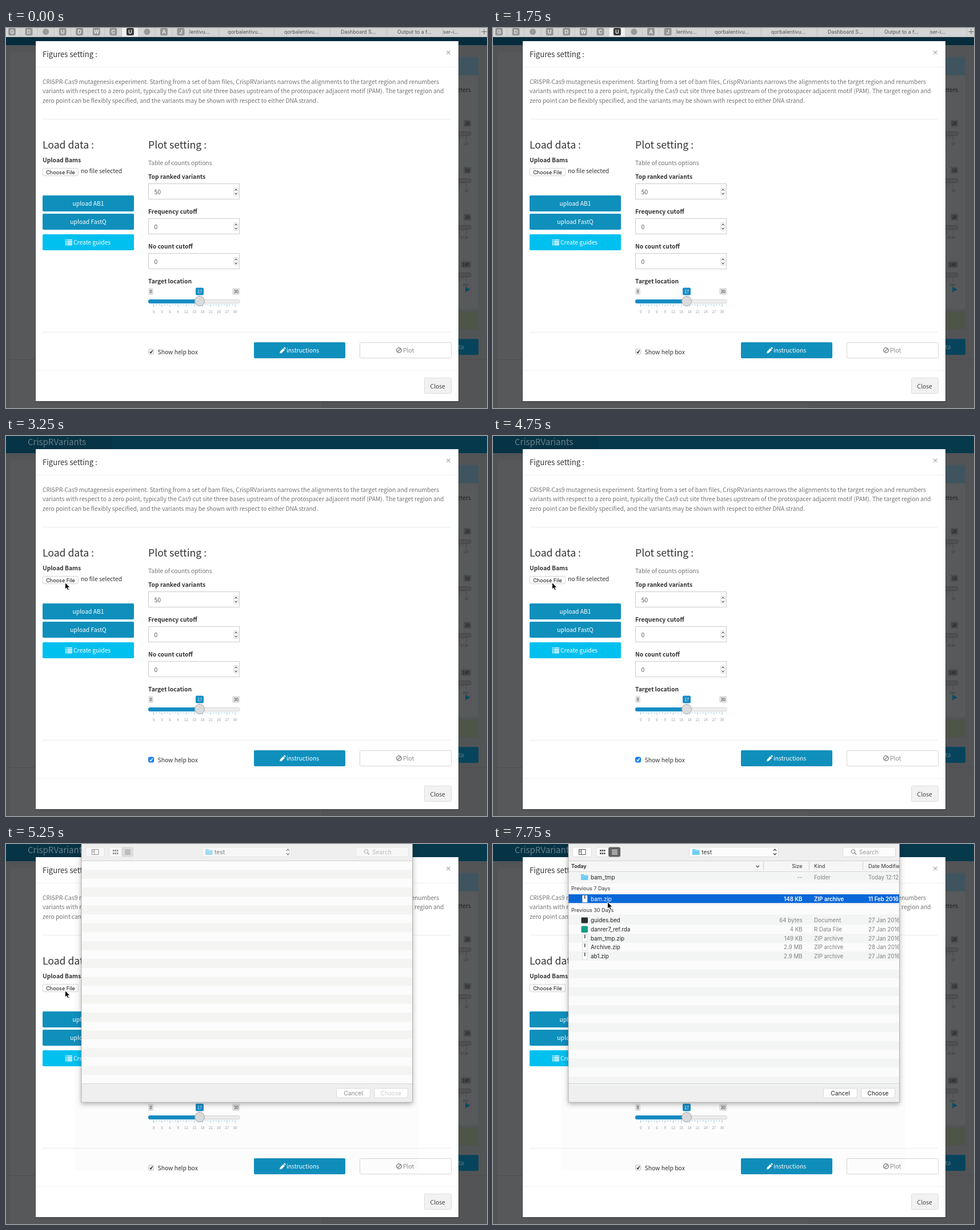
Animation of 842x665 px, one loop 8000 ms. Source, as an HTML page:

```html
<!DOCTYPE html>
<html lang="en">
<head>
<meta charset="utf-8">
<title>Figures setting</title>
<style>
html, body { margin: 0; width: 100%; height: 100%; overflow: hidden; background: #525456; }
svg { display: block; width: 842px; height: 665px; }
text { font-family: "Noto Sans CJK JP", "Noto Sans CJK SC", "Noto Sans CJK", "Open Sans", sans-serif; white-space: pre; }
text.ui { font-family: Inter, Roboto, sans-serif; }
</style>
</head>
<body>
<svg id="stage" viewBox="0 0 842 665" xmlns="http://www.w3.org/2000/svg"></svg>
<script>
const LOOP = 8000, STEP = 250;
const BLUE = '#0f8fbc';

const rect = (x, y, w, h, fill, extra = '') =>
  `<rect x="${x}" y="${y}" width="${w}" height="${h}" fill="${fill}" ${extra}/>`;
const text = (x, y, s, size = 10.3, fill = '#333', extra = '') =>
  `<text x="${x}" y="${y}" font-size="${size}" fill="${fill}" ${extra}>${s}</text>`;
const path = (d, stroke, extra = '') =>
  `<path d="${d}" fill="none" stroke="${stroke}" ${extra}/>`;
const ui = (x, y, s, size = 9.7, fill = '#222', extra = '') =>
  text(x, y, s, size, fill, `class="ui" ${extra}`);
const group = (id, body, extra = '') => `<g id="${id}" ${extra}>${body}</g>`;
const each = (list, fn) => list.map(fn).join('');
const range = n => Array.from({ length: n }, (_, i) => i);
const BOLD = 'font-weight="700"', MID = 'text-anchor="middle"', END = 'text-anchor="end"';

function backdrop() {
  const sliders = [[167, '20', '20'], [249, '10', '10'], [331, '20', '15 20'], [414, '180', '180']];
  return rect(0, 0, 842, 665, '#525456') +
    rect(8, 43, 544, 622, '#575859') +
    rect(560, 51, 267, 441, '#58595a', 'stroke="#4a565c"') +
    rect(560, 51, 267, 32, '#40545f') +
    rect(560, 496, 267, 31, '#4d5548') +
    rect(0, 580, 842, 1, '#4c4e50') +
    text(790, 112, 'eters', 10.3, '#1d1f20') +
    each(sliders, ([y, top, low]) =>
      rect(top.length > 2 ? 796 : 801, y - 6, top.length > 2 ? 18 : 13, 12, '#494b4d', 'rx="2"') +
      text(top.length > 2 ? 805 : 807.5, y + 3, top, 7.4, '#111', MID) +
      rect(700, y + 14.5, 114, 7, '#4e5052', 'rx="3" stroke="#424446"') +
      path(`M794.5 ${y + 22}v8M799.5 ${y + 22}v4M805.5 ${y + 22}v8`, '#45494c') +
      text(809, y + 38, low, 5.8, '#363839', END)) +
    '<path d="M804 452.5L813 457.5L804 462.5Z" fill="#0d4b63"/>' +
    rect(700, 544, 127, 28, '#06445c', 'rx="2"') + text(792, 562, 'ta', 10.3, '#677b84') +
    group('header', rect(0, 0, 842, 30, '#06394c') + rect(0, 0, 185, 30, '#063345') +
      text(38, 15.5, 'CrispRVariants', 15, '#68818c')) +
    rect(0, 0, 842, 30, '#052c3c', 'id="dark"');
}

function tabBar() {
  const pins = 'GD UDWCU AJ'.split('');
  const tabs = [[321, 'lentivu...'], [388, 'qorbalentivu...'], [487, 'qorbalentivu...'],
    [586, 'Dashboard S...'], [685, 'Output to a f...'], [765, 'ser-i...']];
  return rect(0, 0, 842, 16, '#d4d4d4') + rect(203, 0, 29, 16, '#f0f0f0') +
    each(range(11), i => path(`M${25 + i * 29.55} 0V16`, '#c2c2c2')) +
    each(pins, (c, i) => {
      const x = 10.5 + i * 29.55, on = i === 7;
      return c === ' ' ? `<circle cx="${x}" cy="6.5" r="5.5" fill="#999"/>` :
        rect(x - 6.5, 0, 13, 13, on ? '#3c3c3c' : '#969696', 'rx="2.5"') +
        ui(x, 10, c, 9, '#f4f4f4', `${MID} font-weight="600"`);
    }) +
    each([372.5, 469.5, 567.5, 666.5, 764.5, 829.5], x => path(`M${x} 0V16`, '#bebebe')) +
    each(tabs, ([x, s]) => ui(x, 10, s, 8.9, '#555')) +
    path('M832.5 6.5h9M837 2v9', '#666') + path('M0 15.5H842', '#b5b5b5');
}

const button = (y, label) => rect(64, y, 160, 28, BLUE, 'rx="2"') +
  text(144, y + 18, label, 10.3, '#fff', MID);

function numberField(y, label, value) {
  return text(249, y - 8, label, 10.3, '#333', BOLD) +
    rect(249.5, y + .5, 159, 27, '#fff', 'stroke="#ccc"') +
    text(259.5, y + 18.5, value, 10.3, '#555') +
    rect(398.5, y + 7.5, 8, 14, '#fff', 'rx="3" stroke="#ccc" stroke-width=".8"') +
    path(`M400.5 ${y + 12.5}l2 -2.5l2 2.5M400.5 ${y + 16.5}l2 2.5l2 -2.5`, '#444', 'stroke-width="1.1"');
}

function slider() {
  const tick = i => 258.5 + i * 4.75;
  return text(249, 446.5, 'Target location', 10.3, '#333', BOLD) +
    rect(249, 455, 9, 12, '#e1e1e1', 'rx="2"') + text(253.5, 464, '0', 7.3, '#333', MID) +
    rect(396, 455, 13.5, 12, '#e1e1e1', 'rx="2"') + text(402.7, 464, '30', 7.3, '#333', MID) +
    rect(332, 454.5, 14, 13, '#168cc4', 'rx="2"') + text(339, 464, '17', 7.3, '#fff', MID) +
    rect(249.5, 475.5, 160, 6, '#eee', 'rx="3" stroke="#ccc" stroke-width=".8"') +
    rect(249, 475, 90, 7, '#168cc4', 'rx="3"') +
    each(range(31), i => path(`M${tick(i)} 483v${i % 3 ? 2.5 : 5}`, '#7fb9d8', 'stroke-width=".8"')) +
    each(range(11), i => text(tick(i * 3), 499, i * 3, 6.3, '#999', MID)) +
    '<circle cx="339" cy="478" r="8.5" fill="#dcdcdc" stroke="#a6a6a6"/>';
}

function modal() {
  const intro = [
    'CRISPR-Cas9 mutagenesis experiment. Starting from a set of bam files, CrispRVariants narrows the alignments to the target region and renumbers',
    'variants with respect to a zero point, typically the Cas9 cut site three bases upstream of the protospacer adjacent motif (PAM). The target region and',
    'zero point can be flexibly specified, and the variants may be shown with respect to either DNA strand.'];
  return rect(51, 23, 742, 632, '#000', 'opacity=".18"') + rect(52, 23, 740, 630, '#fff') +
    text(64, 51, 'Figures setting :', 13.1) +
    path('M771.3 39.8l6 6m0 -6l-6 6', '#b5b5b5', 'stroke-width="1.5"') +
    path('M52 68.5H792M52 599.5H792', '#f1f1f1') +
    path('M64 159.5H779M64 532.5H779', '#eaeaea') +
    each(intro, (s, i) => text(64, 98 + i * 16.4, s, 10.3, '#737373')) +
    text(64, 210.5, 'Load data :', 17.6) + text(249, 210.5, 'Plot setting :', 17.6) +
    text(64, 235, 'Upload Bams', 10.3, '#333', BOLD) +
    rect(64.5, 245.5, 62, 13, '#fff', 'id="choose" rx="2.5" stroke="#ccc" stroke-width=".9"') +
    ui(95.5, 255.8, 'Choose File', 9.1, '#111', `id="chooseText" ${MID}`) +
    text(131, 254, 'no file selected') +
    button(293, 'upload AB1') + button(325, 'upload FastQ') +
    rect(64, 361, 160, 28, '#00c0ef', 'rx="2"') +
    path('M104 371h2m1 0h9M104 373.8h2m1 0h9M104 376.6h2m1 0h9M104 379.4h2m1 0h9', '#fff', 'stroke-width="1.7"') +
    text(118, 379, 'Create guides', 10.3, '#fff') +
    text(249, 239.5, 'Table of counts options', 10.3, '#737373') +
    numberField(272, 'Top ranked variants', '50') +
    numberField(333, 'Frequency cutoff', '0') +
    numberField(394, 'No count cutoff', '0') + slider() +
    rect(249.5, 562, 9, 9, '#fff', 'id="box" rx="2" stroke="#bbb"') +
    path('M251.6 566.6l2 2.2l3 -5', '#222', 'id="tick" stroke-width="1.4"') +
    text(265.5, 570.5, 'Show help box') +
    rect(434, 550, 160, 28, BLUE, 'rx="2"') +
    '<path d="M479 569.5l.8 -3.6l5.5 -5.5l2.8 2.8l-5.5 5.5zM486 559.7l1.3 -1.1q.8 -.4 1.8 .8t.3 1.7l-.7 .9z" fill="#fff"/>' +
    text(491, 568, 'instructions', 10.3, '#fff') +
    rect(619.5, 550.5, 160, 27, '#fff', 'rx="2" stroke="#d4d4d4"') +
    '<circle cx="688" cy="564" r="4.2" fill="none" stroke="#888" stroke-width="1.5"/>' +
    path('M685 567l6 -6', '#888', 'stroke-width="1.5"') + text(695, 568, 'Plot', 10.3, '#888') +
    rect(732.5, 612.5, 47, 27, '#f2f2f2', 'rx="2" stroke="#ddd"') +
    text(755.7, 630.7, 'Close', 10.3, '#444', MID);
}

const folder = (x, y) =>
  `<path d="M${x} ${y}h4.5l1.2 1.4h6.8v8.6h-12.5z" fill="#6ccdf3"/>` + rect(x, y + 2.7, 12.5, .8, '#9fe0f8');
const zipIcon = y => rect(156.5, y - 6, 8.5, 12, '#fdfdfd', 'stroke="#d2d2d2" stroke-width=".7"') +
  rect(159.7, y - 6, 2, 6, '#666');

const rows = [
  [58, 'bam_tmp', '--', 'Folder', 'Today 12:12'],
  [96, 'bam.zip', '148 KB', 'ZIP archive', '11 Feb 2016'],
  [133.6, 'guides.bed', '64 bytes', 'Document', '27 Jan 2016'],
  [149.3, 'danrer7_ref.rda', '4 KB', 'R Data File', '27 Jan 2016'],
  [165, 'bam_tmp.zip', '149 KB', 'ZIP archive', '27 Jan 2016'],
  [180.6, 'Archive.zip', '2.9 MB', 'ZIP archive', '28 Jan 2016'],
  [196.3, 'ab1.zip', '2.9 MB', 'ZIP archive', '27 Jan 2016']];

function rowText([y, name, size, kind, date], nameFill, fill, extra = '') {
  return ui(171, y + 3.5, name, 9.8, nameFill) + ui(541.5, y + 3.5, size, 9.7, fill, `${END} ${extra}`) +
    ui(562, y + 3.5, kind, 9.7, fill, extra) + ui(657, y + 3.5, date, 9.7, fill, extra);
}

function fileList() {
  const stripe = y => rect(132, y, 580, 15.6, '#f3f4f4');
  return rect(132, 29, 580, 390, '#fbfbfb') + rect(132, 29, 580, 19, '#f6f6f6') +
    each([50, 88], stripe) + each(range(10), i => stripe(125.8 + i * 31.25)) +
    path('M132 48.5H712', '#d2d2d2') + path('M473.5 31V46M553.5 31V46M647.5 31V46', '#d0d0d0') +
    path('M132 67.5H712M132 86.5H712M132 105.5H712M132 124.5H712', '#eee') +
    ui(137, 42, 'Today', 9, '#222', 'font-weight="600"') +
    path('M460.5 38l2.7 2.7l2.7 -2.7', '#444', 'stroke-width="1.2"') +
    ui(541.5, 42, 'Size', 9.1, '#333', END) + ui(562, 42, 'Kind', 9.1, '#333') +
    ui(657, 42, 'Date Modified', 9.1, '#333') +
    ui(137, 80.5, 'Previous 7 Days', 9, '#333') + ui(137, 118.5, 'Previous 30 Days', 9, '#333') +
    each(rows, r => rowText(r, '#222', '#808080')) +
    folder(154, 53) + each([96, 165, 180.6, 196.3], zipIcon) +
    rect(154.5, 128.5, 11.5, 10, '#2b2f30', 'rx="1"') + rect(154.5, 143.5, 11.5, 11.5, '#159e86', 'rx="1.5"') +
    group('selected', rect(132, 88, 580, 15.3, '#0a67d8') + zipIcon(96) +
      rowText(rows[1], '#fff', '#fff', 'font-weight="600"'));
}

function sheet() {
  const pill = (x, w) => rect(x + .5, 5.5, w - 1, 17, '#fdfdfd', 'rx="3" stroke="#d5d5d5" stroke-width=".8"');
  const push = (x, w, label, id) =>
    rect(x + .5, 427.5, w - 1, 16.5, '#fff', 'rx="3" stroke="#d0d0d0" stroke-width=".8"') +
    ui(x + w / 2, 439.7, label, 10.2, '#222', `${MID} id="${id}"`);
  const tools = pill(139, 34) + rect(150.5, 9.5, 11.5, 9, 'none', 'stroke="#555"') +
    path('M154.5 9.5v9M151.5 12h2M151.5 14h2', '#555') +
    pill(180, 43) + rect(202, 5.5, 21, 17, '#636363', 'rx="3" id="segment"') +
    each(range(6), i => rect(187 + i % 3 * 3.5, 10 + (i / 3 | 0) * 5, 2.5, 3, '#555')) +
    path('M208 10.5h10M208 13h10M208 15.5h10M208 18h10', '#fff', 'id="bars"') +
    pill(343, 157) + folder(349, 9) + ui(365, 17.6, 'test', 10.3, '#333') +
    path('M491 12l2.5 -3l2.5 3M491 16l2.5 3l2.5 -3', '#444', 'stroke-width="1.2"') +
    pill(612, 93) + '<circle cx="630.5" cy="13" r="3.3" fill="none" stroke="#777"/>' +
    path('M633 15.5l3 3', '#777', 'stroke-width="1.2"') + ui(641, 17.6, 'Search', 10.2, '#999');
  return rect(132, -130, 579.5, 582, '#efefef', 'filter="url(#soft)"') +
    '<g clip-path="url(#pane)">' + group('tools', tools) +
    group('blank', rect(132, 29, 580, 390, '#fcfcfc') +
      each(range(12), i => rect(132, 45 + i * 31.25, 580, 15.6, '#f4f4f2'))) +
    group('files', fileList()) +
    path('M132 29.5H712M132 419.5H712', '#d3d3d3') +
    push(578, 60, 'Cancel', 'cancel') + push(644, 60, 'Choose', 'pick') + '</g>' +
    rect(132, -130, 579.5, 582, 'none', 'stroke="#aaa" stroke-width=".8"');
}

const stage = document.getElementById('stage');
stage.innerHTML = `<defs>
  <filter id="soft" x="-5%" y="-5%" width="110%" height="112%"><feDropShadow dx="0" dy="3" stdDeviation="4" flood-opacity=".32"/></filter>
  <clipPath id="pane"><rect x="132" y="-130" width="579.5" height="582"/></clipPath></defs>` +
  backdrop() + group('tabs', tabBar()) + modal() +
  group('haze', rect(120, 0, 602, 571, '#000', 'opacity=".012"')) +
  group('edge', rect(102, 30, 30, 414, '#000', 'opacity=".012"')) +
  group('sheet', sheet()) +
  group('cursor', '<path d="M0 0V11.6L2.7 9.2L4.7 13.6L6.7 12.7L4.8 8.5H8.4Z" fill="#000" stroke="#fff" stroke-width=".9"/>');

const el = id => document.getElementById(id);
const show = (id, on) => el(id).setAttribute('display', on ? 'inline' : 'none');
const set = (id, name, value) => el(id).setAttribute(name, value);

// [start ms, x, y]; a missing position hides the pointer
const pointer = [[0], [500, 257, 226], [1250], [2250, 150, 237], [2500, 71, 225], [2750, 98, 259],
  [3000, 103.5, 256.5], [5750, 200, 143], [6000, 208, 136], [6250, 207, 126], [6500, 200.5, 101.5]];

function draw(now) {
  const t = Math.floor(now % LOOP / STEP) * STEP;
  const within = (a, b) => t >= a && t < b;

  const barOpen = t < 500 || within(1750, 2250);
  show('tabs', barOpen || t === 2250);
  set('tabs', 'transform', `translate(0 ${t === 2250 ? -8 : 0})`);
  show('dark', barOpen);

  const [, x, y] = pointer.findLast(p => p[0] <= t);
  show('cursor', x !== undefined);
  if (x !== undefined) set('cursor', 'transform', `translate(${x} ${y})`);

  const checked = within(3250, 5250), pressed = t === 4500;
  set('box', 'fill', checked ? '#1684f8' : '#fff');
  set('box', 'stroke', checked ? '#1478e4' : '#bbb');
  set('tick', 'stroke', checked ? '#fff' : '#222');
  set('choose', 'fill', pressed ? '#3c8ef6' : '#fff');
  set('choose', 'stroke', pressed ? '#2b77d8' : '#ccc');
  set('chooseText', 'fill', pressed ? '#fff' : '#111');

  const ready = t >= 5500, chosen = t >= 7750;
  show('sheet', t >= 5000);
  set('sheet', 'transform', `translate(0 ${t === 5000 ? -126 : 0})`);
  show('haze', t >= 5250);
  show('edge', ready && t < 7500);
  show('blank', !ready);
  show('files', ready);
  show('selected', chosen);
  set('tools', 'opacity', ready ? 1 : .6);
  set('segment', 'fill', ready ? '#636363' : '#d0d0d0');
  set('bars', 'stroke', ready ? '#fff' : '#555');
  set('cancel', 'fill', ready ? '#222' : '#8a8a8a');
  set('pick', 'fill', chosen ? '#222' : ready ? '#a0a0a0' : '#ccc');
}

let start;
function frame(now) {
  start ??= now;
  draw(now - start);
  requestAnimationFrame(frame);
}
draw(0);
requestAnimationFrame(frame);
</script>
</body>
</html>
```
